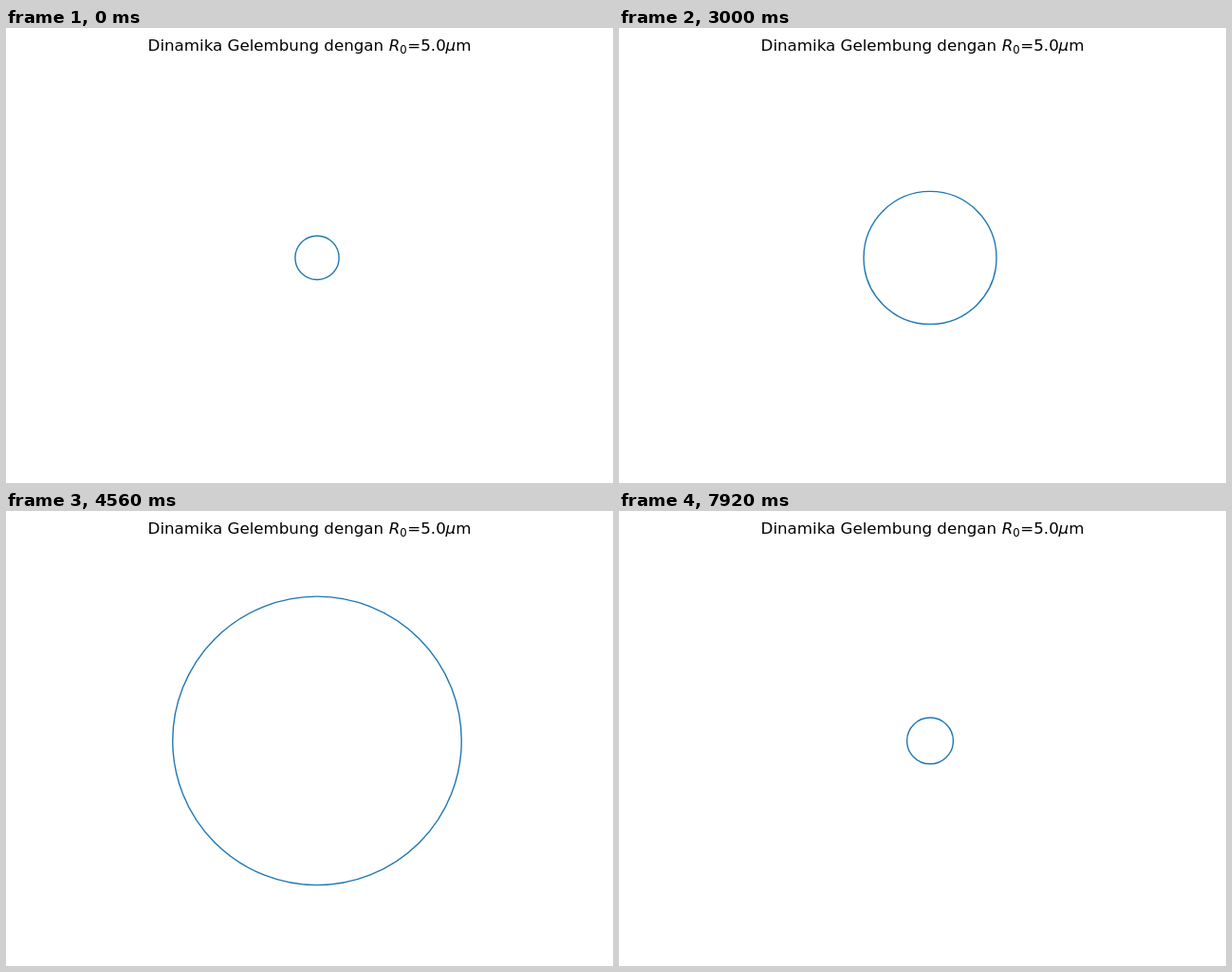
These frames come from a looping animation (640 by 480 pixels, 8000 ms). An HTML page:

```html
<!DOCTYPE html>
<html lang="id">
<head>
<meta charset="utf-8">
<title>Dinamika Gelembung</title>
<style>
  html, body { margin: 0; width: 100%; height: 100%; overflow: hidden; background: #fff; }
  svg { display: block; width: 640px; height: 480px; }
  text { font: 16.667px "DejaVu Sans", sans-serif; fill: #000; white-space: pre; }
  .it { font-style: italic; }
  .sub { font-size: 11.667px; }
</style>
</head>
<body>
<svg viewBox="0 0 640 480">
  <text x="149.6" y="24">Dinamika Gelembung dengan <tspan class="it" x="403.7">R</tspan><tspan class="sub" x="415.2" y="26.7">0</tspan><tspan x="423.3" y="24">=5.0</tspan><tspan class="it" x="463.6">μ</tspan><tspan x="474.2">m</tspan></text>
  <circle id="bubble" cx="328" cy="242.4" r="23.1" fill="none" stroke="#1f77b4" stroke-width="1.389"/>
</svg>
<script>
const LOOP = 8000, STEP = 120;
const bubble = document.getElementById('bubble');

// [time, radius] while the bubble expands
const growth = [[0, 22], [900, 22], [1680, 23.3], [2040, 27], [2520, 37.5],
                [3000, 70], [3360, 106.8], [3960, 157.8], [4230, 163.2]];
const PEAK = 4230;

const wave = (t, period) => Math.cos(2 * Math.PI * t / period);

function slope(i) {
  if (i === 0 || i === growth.length - 1) return 0;
  const [a, b] = [growth[i - 1], growth[i + 1]];
  return (b[1] - a[1]) / (b[0] - a[0]);
}

function hermite(t) {
  let i = 0;
  while (i < growth.length - 2 && t >= growth[i + 1][0]) i++;
  const [t0, r0] = growth[i], [t1, r1] = growth[i + 1];
  const d = t1 - t0, u = (t - t0) / d, v = 1 - u;
  return v * v * ((1 + 2 * u) * r0 + u * d * slope(i)) +
         u * u * ((3 - 2 * u) * r1 - v * d * slope(i + 1));
}

// Rayleigh-like arc around its largest radius
const arc = (t, mid, half, max) =>
  max * Math.pow(Math.max(0.01, 1 - ((t - mid) / half) ** 2), 0.4);

function radius(t) {
  if (t < PEAK) return hermite(t) + 1.1 * Math.max(0, 1 - t / 1800) * wave(t, 258);
  if (t < 5057) return arc(t, PEAK, 827, 163.2);
  if (t < 5597) return arc(t, 5327, 271, 46.5);
  if (t < 5949) return arc(t, 5773, 176, 30.5);
  const s = t - 6000;
  return 18.8 + 0.0021 * s + 4.6 * Math.exp(-s / 2600) * wave(t - 6600, 257.6);
}

const start = performance.now();
function draw() {
  const t = Math.max(0, performance.now() - start) % LOOP;
  bubble.setAttribute('r', radius(Math.floor(t / STEP) * STEP).toFixed(2));
  requestAnimationFrame(draw);
}
draw();
</script>
</body>
</html>
```
